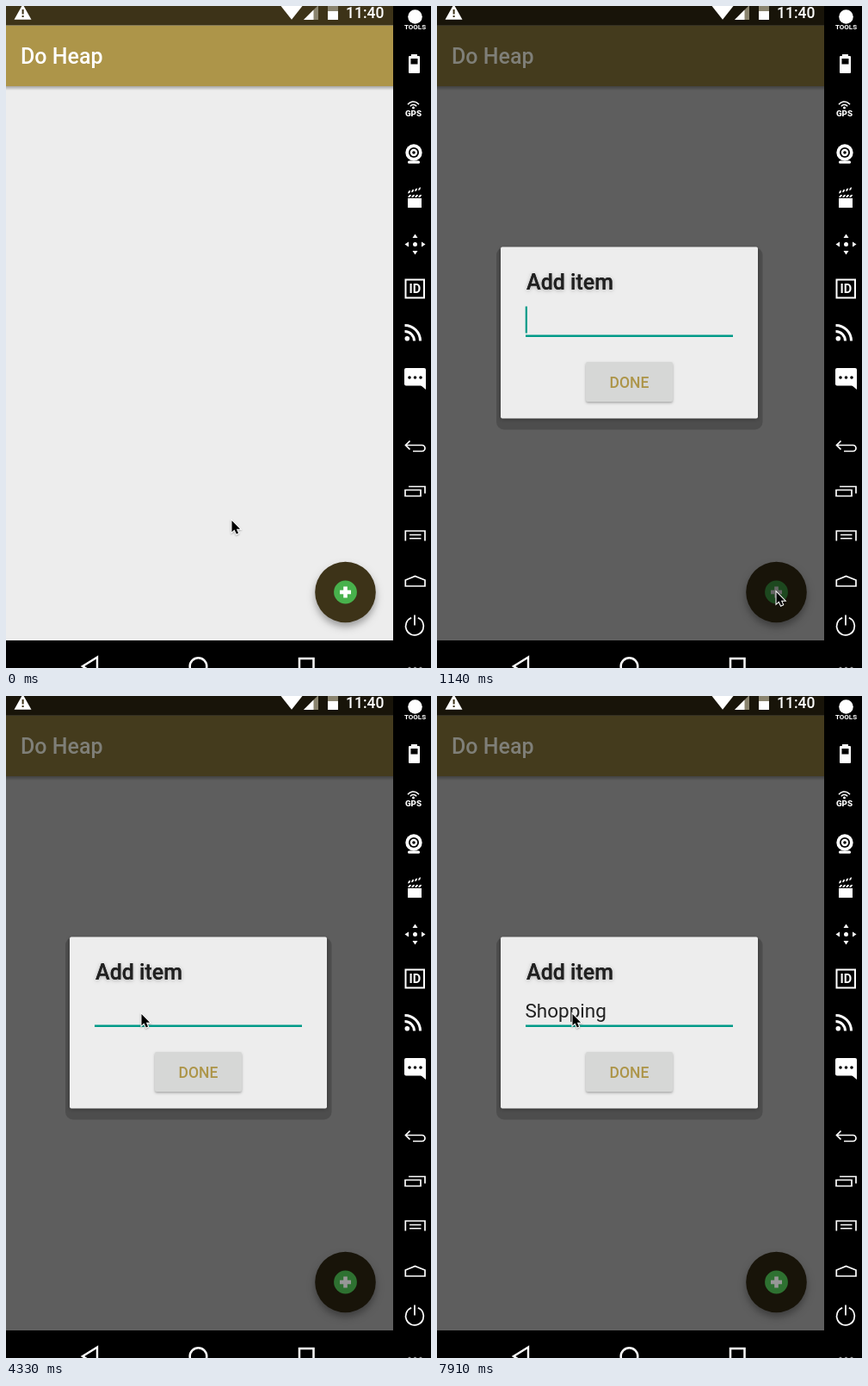
Recreate the animation shown at these times as an HTML page with a canvas. Size 494x768 px, loop 8 s.

```html
<!DOCTYPE html>
<html lang="en">
<head>
<meta charset="utf-8">
<title>Add an item</title>
<style>
html, body { margin: 0; width: 100%; height: 100%; overflow: hidden; background: #000; }
canvas { display: block; width: 494px; height: 768px; }
</style>
</head>
<body>
<canvas id="stage" width="494" height="768"></canvas>
<script>
const ctx = document.getElementById('stage').getContext('2d');
const LOOP = 8000, TEAL = '#009a88', GOLD = '#ad9549', OLIVE = '#3d3318';
const ITEM = 'Shopping';
const KEY_TIMES = [5760, 5840, 6380, 6740, 6830, 7100, 7280, 7460];
// The caret toggles at each of these times; the first turns it on.
const CARET_TIMES = [1060, 1410, 1850, 2370, 2800, 3340, 3790, 4330, 4870, 5320, 5760, 7910];

const countPast = (times, t) => times.filter(x => t >= x).length;

function rect(x, y, w, h, color) {
  ctx.fillStyle = color;
  ctx.fillRect(x, y, w, h);
}

function round(x, y, w, h, r, color) {
  ctx.beginPath();
  ctx.roundRect(x, y, w, h, r);
  ctx.fillStyle = color;
  ctx.fill();
}

function disc(x, y, r, color) {
  ctx.beginPath();
  ctx.arc(x, y, r, 0, Math.PI * 2);
  ctx.fillStyle = color;
  ctx.fill();
}

function arc(x, y, r, from, to, width) {
  ctx.beginPath();
  ctx.arc(x, y, r, from * Math.PI, to * Math.PI);
  ctx.lineWidth = width;
  ctx.strokeStyle = '#fff';
  ctx.stroke();
}

function trace(points, closed) {
  ctx.beginPath();
  points.forEach(([x, y]) => ctx.lineTo(x, y));
  if (closed) ctx.closePath();
}

function poly(points, color = '#fff') {
  trace(points, true);
  ctx.fillStyle = color;
  ctx.fill();
}

function line(points, width = 1.7, closed = false) {
  trace(points, closed);
  ctx.lineWidth = width;
  ctx.strokeStyle = '#fff';
  ctx.stroke();
}

function text(str, x, y, size, color, weight = 500, align = 'left') {
  ctx.font = `${weight} ${size}px Roboto, sans-serif`;
  ctx.textAlign = align;
  ctx.fillStyle = color;
  ctx.fillText(str, x, y);
}

function shadow(blur, dy, alpha) {
  ctx.shadowColor = `rgba(0,0,0,${alpha})`;
  ctx.shadowBlur = blur;
  ctx.shadowOffsetY = dy;
}

function drawApp(dim, hoverLeft) {
  rect(0, 0, 450, 736, '#ededed');
  const edge = ctx.createLinearGradient(0, 93, 0, 98);
  edge.addColorStop(0, 'rgba(0,0,0,.3)');
  edge.addColorStop(1, 'rgba(0,0,0,0)');
  rect(0, 93, 450, 5, edge);
  rect(0, 22.5, 450, 70.5, GOLD);
  rect(0, 0, 450, 22.5, OLIVE);

  shadow(8, 5, 0.34);
  disc(394.5, 680, 35.3, OLIVE);
  shadow(0, 0, 0);
  if (!dim) text('Do Heap', 17, 67, 25, '#fff');
  else rect(0, 0, 450, 736, `rgba(0,0,0,${dim})`);
  if (dim) text('Do Heap', 17, 67, 25, dim > 0.5 ? '#7f7f78' : '#a4a4a4');

  const deep = dim > 0.5 && !hoverLeft;
  disc(394.5, 680, 13.4, !dim ? '#48b14c' : deep ? '#1d481f' : '#2e7131');
  const plus = !dim ? '#fff' : deep ? '#666' : '#979797';
  rect(388, 677.7, 13, 4.6, plus);
  rect(392.2, 673.5, 4.6, 13, plus);
}

function drawStatus() {
  poly([[19.5, -2], [29.5, 15.7], [9.5, 15.7]]);
  rect(18.6, 4, 2, 5.5, OLIVE);
  rect(18.6, 11, 2, 2, OLIVE);
  poly([[319.5, 0], [344.5, 0], [332, 15.7]]);
  poly([[346, 16], [363, -1], [363, 16]], '#8a846f');
  poly([[346, 16], [357.5, 4.5], [357.5, 16]]);
  rect(374, 0, 12, 6, '#8a846f');
  rect(374, 6, 12, 10, '#fff');
  text('11:40', 439.5, 14, 17.5, '#fff', 500, 'right');
}

function drawNavigation() {
  rect(0, 736, 450, 32, '#000');
  line([[106, 755.5], [89, 766], [106, 776.5]], 2.4, true);
  arc(223.5, 766, 9.8, 0, 2, 2.5);
  line([[341, 757], [357.5, 757], [357.5, 774], [341, 774]], 2.5, true);
}

function drawSidebar() {
  rect(450, 0, 44, 768, '#000');
  disc(475.5, 12.5, 8.3, '#fff');
  text('TOOLS', 475.5, 26.7, 8, '#fff', 700, 'center');

  rect(471, 56, 7, 3, '#fff');
  round(468, 58, 13, 20, 1, '#fff');
  rect(470.5, 61, 8, 6.5, '#000');

  disc(473.5, 118, 1.5, '#fff');
  arc(473.5, 119, 4.5, 1.2, 1.8, 1.5);
  arc(473.5, 119, 8, 1.2, 1.8, 1.5);
  text('GPS', 473.5, 128, 9.8, '#fff', 900, 'center');

  disc(474, 170, 9.7, '#fff');
  disc(474, 170, 6, '#000');
  disc(474, 170, 4.2, '#fff');
  disc(474, 170, 1.8, '#000');
  round(467, 179.5, 14, 3.2, 1.5, '#fff');

  rect(467, 223, 16, 11, '#fff');
  for (let i = 0; i < 4; i++) {
    const x = 467 + i * 4;
    poly([[x, 222], [x + 2, 219], [x + 4.3, 219], [x + 2.3, 222]]);
    const y = 217.5 - i * 1.2;
    poly([[x, y], [x + 1, y - 3], [x + 3.2, y - 3.6], [x + 2.2, y - 0.6]]);
  }

  disc(475.5, 276.5, 2.5, '#fff');
  for (let i = 0; i < 4; i++) {
    ctx.save();
    ctx.translate(475.5, 276.5);
    ctx.rotate(i * Math.PI / 2);
    poly([[0, -12], [3, -7.5], [-3, -7.5]]);
    ctx.restore();
  }

  line([[464.5, 317.5], [486, 317.5], [486, 338.5], [464.5, 338.5]], 2, true);
  text('ID', 475.3, 333.3, 14.5, '#fff', 700, 'center');

  disc(466.3, 385.7, 2.8, '#fff');
  arc(463.5, 388.5, 11, 1.5, 2, 3);
  arc(463.5, 388.5, 18, 1.5, 2, 3);

  round(463, 420, 25, 20.5, 2, '#fff');
  poly([[482, 440], [488, 437], [488, 445]]);
  for (const x of [469, 475.5, 482]) disc(x, 431, 1.8, '#000');

  line([[469.5, 504.5], [464.5, 509.5], [469.5, 514.5]]);
  ctx.beginPath();
  ctx.moveTo(464.5, 509.5);
  ctx.lineTo(483.5, 509.5);
  ctx.arc(483.5, 513, 3.5, -Math.PI / 2, Math.PI / 2);
  ctx.lineTo(473, 516.5);
  ctx.stroke();

  line([[464, 561.5], [482, 561.5], [482, 568.5], [464, 568.5]], 1.7, true);
  line([[468, 557.5], [487, 557.5], [487, 565.5]]);

  line([[464.3, 620.5], [464.3, 609], [487, 609], [487, 620.5]]);
  line([[469, 613.5], [482.5, 613.5]], 1.5);
  line([[469, 617.7], [482.5, 617.7]], 1.5);

  line([[464.3, 673], [464.3, 666], [475.5, 661.5], [487, 666], [487, 673]], 1.7, true);

  arc(475, 719.5, 10.4, -0.38, 1.38, 1.7);
  line([[475, 706.5], [475, 718.5]]);
  for (const x of [469, 475.5, 482]) disc(x, 768.5, 1.7, '#999');
}

function drawDialog(t) {
  if (t < 1140) {
    round(58, 270, 332, 232, 14, 'rgba(0,0,0,.04)');
    round(63, 273, 322, 224, 12, 'rgba(0,0,0,.05)');
    round(68, 276, 311, 214, 8, 'rgba(0,0,0,.15)');
  } else {
    round(69, 280, 309.5, 211.5, 9, '#4d4d4d');
  }
  shadow(4, 1, 0.3);
  round(74, 279.5, 299, 199, 2, '#ededed');
  text('Add item', 104, 329, 25, '#212121');
  shadow(0, 0, 0);
  text('Add item', 104, 329, 25, '#212121');
  rect(103, 381.5, 241, 2.5, TEAL);
  shadow(3, 1.5, 0.3);
  round(173, 413, 101, 46, 2, '#d6d7d6');
  shadow(0, 0, 0);
  text('DONE', 223.5, 442.6, 17.5, GOLD, 500, 'center');

  const typed = ITEM.slice(0, countPast(KEY_TIMES, t));
  text(typed, 102.5, 373, 22.5, '#212121', 400);
  if (countPast(CARET_TIMES, t) % 2) {
    const x = typed ? Math.round(102 + ctx.measureText(typed).width) : 102.7;
    rect(x, 348.5, 2.2, 31, TEAL);
  }
}

// Pointer positions advance in discrete steps along an eased path.
function glide(t, start, end, steps, a, b) {
  const k = Math.floor((t - start) / (end - start) * (steps - 1) + 1e-6) + 1;
  const p = Math.max(0, Math.min(1, k / steps));
  const e = p * p * (3 - 2 * p);
  return a.map((v, i) => Math.round(v + (b[i] - v) * e));
}

function pointerAt(t) {
  const idle = [262, 597], button = [394, 680], field = [158, 370];
  if (t < 90) return idle;
  if (t < 1580) return glide(t, 90, 790, 9, idle, button);
  if (t < 2450) return glide(t, 1580, 2370, 10, button, field);
  return t < 2630 ? [158, 368] : [157, 369];
}

function drawPointer([x, y]) {
  ctx.save();
  ctx.translate(x + 0.5, y);
  const shape = [[0, 0], [0, 13.2], [3, 10.6], [5.3, 15.6], [7.6, 14.6], [5.4, 9.7], [9.6, 9.7]];
  shadow(2, 1, 0.3);
  line(shape, 2, true);
  shadow(0, 0, 0);
  poly(shape, '#000');
  ctx.restore();
}

function draw(t) {
  const dim = t < 1060 ? 0 : t < 1140 ? 0.36 : 0.604;
  drawApp(dim, t >= 1580);
  drawStatus();
  if (dim) drawDialog(t);
  drawNavigation();
  drawSidebar();
  drawPointer(pointerAt(t));
}

const began = performance.now();
function tick() {
  draw((performance.now() - began) % LOOP);
  requestAnimationFrame(tick);
}
tick();
</script>
</body>
</html>
```
